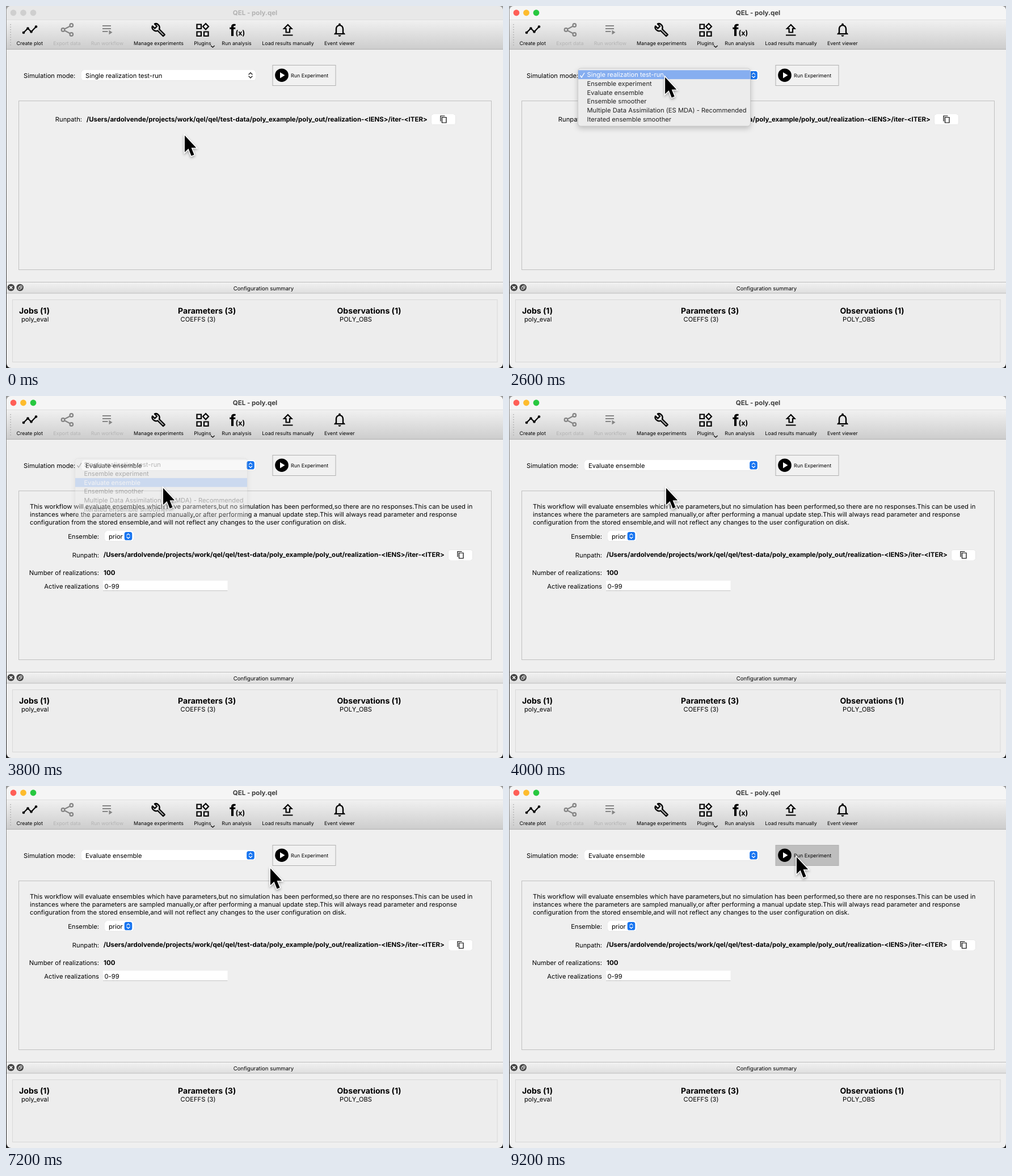
An HTML page that plays this animation: 876x639 px, repeating every 9.6 s.

```html
<!DOCTYPE html>
<html lang="en">
<head>
<meta charset="utf-8">
<title>Experiment runner</title>
<style>
html, body { margin: 0; width: 100%; height: 100%; overflow: hidden; background: #444; }
svg { display: block; width: 100%; height: 100%; }
text {
  font: 11.2px Inter, "Open Sans", sans-serif;
  font-feature-settings: "calt" 0;
  text-rendering: geometricPrecision;
  white-space: pre;
}
.bold { font-weight: 700; font-size: 11.5px; }
.head { font-weight: 700; font-size: 14.1px; }
.small { font-size: 8.9px; }
.mid { text-anchor: middle; }
.end { text-anchor: end; }
.line { fill: none; stroke: #000; stroke-width: 2.2; }
.off { fill: #b4b4b4; }
.field { fill: #fff; filter: drop-shadow(0 .6px .5px #0004); }
#menu { filter: drop-shadow(0 4px 5px #0003); }
#cursor { filter: drop-shadow(0 2px 2px #0005); }
</style>
</head>
<body>
<svg viewBox="0 0 876 639">
  <defs>
    <linearGradient id="back" x2="0" y2="1"><stop stop-color="#999"/><stop offset="1" stop-color="#222"/></linearGradient>
    <linearGradient id="bar" x2="0" y2="1"><stop stop-color="#f1f1f1"/><stop offset="1" stop-color="#cdcdcd"/></linearGradient>
    <linearGradient id="dock" x2="0" y2="1"><stop stop-color="#f2f2f2"/><stop offset="1" stop-color="#dedede"/></linearGradient>
    <clipPath id="frame"><rect x="1" width="875" height="639" rx="8"/></clipPath>
    <path id="chevrons" d="M-3-1.6 0-4.6 3-1.6M-3 1.6 0 4.6 3 1.6" fill="none" stroke-width="1.4" stroke-linecap="round" stroke-linejoin="round"/>
    <g id="stepper">
      <rect x="-6.8" y="-7.2" width="13.6" height="14.4" rx="3.6" fill="#1674f0"/>
      <use href="#chevrons" stroke="#fff" transform="scale(.9)"/>
    </g>
  </defs>
  <rect width="876" height="639" fill="url(#back)"/>
  <g clip-path="url(#frame)">
    <rect width="876" height="639" fill="#efefef"/>

    <rect id="titlebar" width="876" height="24"/>
    <g id="lights">
      <circle cx="13" cy="12" r="5.4"/><circle cx="30.5" cy="12" r="5.4"/><circle cx="48" cy="12" r="5.4"/>
    </g>
    <text id="title" class="bold mid" x="439" y="16">QEL - poly.qel</text>

    <rect y="24" width="876" height="52" fill="url(#bar)"/>
    <path d="M0 24.5H876" stroke="#dedede"/>
    <path d="M0 76.5H876" stroke="#b2b2b2"/>
    <path d="M8 32V72" stroke="#aaa" stroke-width="1.5" stroke-dasharray="1.5 3"/>
    <g id="labels"></g>

    <path class="line" d="M31 47 38.500 39.500 44.500 45.500 53 36.500"/>
    <circle cx="31" cy="47" r="2.3"/><circle cx="38.500" cy="39.500" r="2.3"/>
    <circle cx="44.500" cy="45.500" r="2.3"/><circle cx="53" cy="36.500" r="2.3"/>
    <g class="line" style="stroke:#858585">
      <path d="M113 35.500 103 40.700M103 43.300 113 48.500"/>
      <circle cx="115.300" cy="34" r="2.8"/><circle cx="100.500" cy="42" r="2.8"/><circle cx="115.300" cy="50" r="2.8"/>
      <path d="M170 35H185M170 40H185M170 45H179.500"/>
    </g>
    <path d="M181.500 42.500 187.500 46.500 181.500 50.500Z" fill="#858585"/>
    <path class="line" transform="translate(256 29.500) scale(1.08)" stroke-linejoin="round"
      d="M22 19.500 13 10.500C14.200 7.500 13.400 5 11.600 3.300 9.500 1.300 7 1.200 5.500 1.900L9.300 5.800 5.800 9.300 1.900 5.500C1.200 7 1.300 9.500 3.300 11.600 5 13.400 7.500 14.200 10.500 13L19.500 22Z"/>
    <path class="line" d="M336.500 32.500h7.500v7.500h-7.500zM336.500 45.500h7.500v7.500h-7.500zM349 45.500h7.500v7.500h-7.500zM352 31 357 36.200 352 41.400 347 36.200Z"/>
    <path class="line" style="stroke-width:1.2" d="M361 70 364.300 73 367.600 70"/>
    <text class="bold" x="394" y="53" style="font-size:28px">f</text>
    <text class="bold" x="404.500" y="52" style="font-size:12.500px">(x)</text>
    <path class="line" d="M488 51.500H505.500M496.800 33 503.500 40H500V46.500H493.600V40H490Z"/>
    <path transform="translate(573.600 27.500) scale(1.2)"
      d="M12 22c1.100 0 2-.9 2-2h-4c0 1.100.9 2 2 2zm6-6v-5c0-3.100-1.600-5.600-4.500-6.300V4c0-.8-.7-1.500-1.500-1.500s-1.500.7-1.500 1.500v.7C7.600 5.400 6 7.900 6 11v5l-2 2v1h16v-1zm-2 1H8v-6c0-2.500 1.500-4.500 4-4.500s4 2 4 4.500z"/>

    <text x="31" y="127">Simulation mode:</text>
    <rect class="field" x="133" y="113" width="307" height="18.500" rx="4.500"/>
    <text id="mode" x="140" y="126.500"></text>
    <use id="idle" href="#chevrons" x="431" y="122.300" stroke="#222"/>
    <use id="live" href="#stepper" x="431" y="122.300"/>

    <rect id="run" x="470" y="104.500" width="111" height="36" stroke="#b0b0b0"/>
    <circle cx="486" cy="122.200" r="11.800"/>
    <path d="M483 117 491.500 122.200 483 127.500Z" fill="#fff"/>
    <text class="small" x="502" y="126">Run Experiment</text>

    <rect x="22.500" y="167.500" width="833" height="298" fill="none" stroke="#c0c0c0"/>
    <g id="path">
      <text class="end" x="134" y="204">Runpath:</text>
      <text class="bold" x="141.700" y="203.700">/Users/ardolvende/projects/work/qel/qel/test-data/poly_example/poly_out/realization-&lt;IENS&gt;/iter-&lt;ITER&gt;</text>
      <rect class="field" x="749.500" y="191" width="43" height="18.500" rx="4.500"/>
      <path class="line" style="stroke-width:1.2" d="M768.500 196.500h7.500v9.500h-7.500zM766 203.500V194H773.500"/>
    </g>
    <g id="details">
      <text x="42" y="198.500">This workflow will evaluate ensembles which have parameters,but no simulation has been performed,so there are no responses.This can be used in</text>
      <text x="42" y="212.500">instances where the parameters are sampled manually,or after performing a manual update step.This will always read parameter and response</text>
      <text x="42" y="226.500">configuration from the stored ensemble,and will not reflect any changes to the user configuration on disk.</text>
      <text class="end" x="164" y="252">Ensemble:</text>
      <rect class="field" x="174" y="238" width="51" height="18.500" rx="4.500"/>
      <text x="181" y="251.500">prior</text>
      <use href="#stepper" x="215.500" y="247.300"/>
      <text class="end" x="164" y="316">Number of realizations:</text>
      <text class="bold" x="172" y="316">100</text>
      <text class="end" x="164" y="339.500">Active realizations</text>
      <rect x="171" y="326" width="219.500" height="18" fill="#fff"/>
      <path d="M171 343.700H390.500" stroke="#c2c2c2"/>
      <text x="173.500" y="339.500">0-99</text>
    </g>

    <rect y="488" width="876" height="19" fill="url(#dock)"/>
    <path d="M0 487.500H876M0 507H876" stroke="#bcbcbc"/>
    <circle cx="8.800" cy="497" r="6.200" fill="#444"/><circle cx="24.700" cy="497" r="6.200" fill="#444"/>
    <path d="M6.300 494.500l5 5m0-5l-5 5" stroke="#fff" stroke-width="1.600"/>
    <path d="M22 496h4v4h-4zM24 496V494H28V498H26" fill="none" stroke="#fff" stroke-width=".9"/>
    <text class="mid" x="454" y="501.500" style="font-size:9.600px">Configuration summary</text>
    <rect x="11.500" y="518.500" width="854.500" height="110" fill="#ededed" stroke="#d8d8d8"/>
    <text class="head" x="23" y="543">Jobs (1)</text><text x="27" y="557">poly_eval</text>
    <text class="head" x="303" y="543">Parameters (3)</text><text x="307.500" y="557">COEFFS (3)</text>
    <text class="head" x="583.500" y="543">Observations (1)</text><text x="588" y="557">POLY_OBS</text>

    <g id="menu">
      <rect x="121.500" y="110" width="304" height="102" rx="5" fill="#ececec" stroke="#c4c4c4" stroke-width=".8"/>
      <rect id="glow" x="122" width="303" height="15.800" fill="#86aef0"/>
      <path id="tick" d="M125.500 122.500 128 126 133 118" fill="none" stroke-width="1.300"/>
    </g>
  </g>
  <path id="cursor" d="M1 2.500V32L7.600 25.800 12.600 38.500 17.600 36.500 12.600 24.300H21.200Z" stroke="#fff" stroke-width="3" paint-order="stroke"/>
</svg>
<script>
const $ = id => document.getElementById(id);
const show = (id, on) => $(id).style.opacity = +on;

function addText(parent, text, x, y, cls) {
  const el = document.createElementNS("http://www.w3.org/2000/svg", "text");
  el.textContent = text;
  el.setAttribute("x", x);
  el.setAttribute("y", y);
  el.setAttribute("class", cls);
  return $(parent).appendChild(el);
}

[["Create plot", 41.7], ["Export data", 107.3, "off"], ["Run workflow", 178.3, "off"],
 ["Manage experiments", 269], ["Plugins", 346.5], ["Run analysis", 406.5],
 ["Load results manually", 497], ["Event viewer", 587.8]]
  .forEach(([name, x, cls = ""]) => addText("labels", name, x, 69, "small mid " + cls));

const ROW = 15.75, ROW_TOP = 113.3;
const modes = ["Single realization test-run", "Ensemble experiment", "Evaluate ensemble",
  "Ensemble smoother", "Multiple Data Assimilation (ES MDA) - Recommended", "Iterated ensemble smoother"];
const items = modes.map((name, i) => addText("menu", name, 137.5, 125.2 + ROW * i, ""));

// Cursor stops: time, x, y
const stops = [[0, 314, 226], [200, 314, 226], [800, 273, 121], [2500, 274, 121], [3200, 276, 160],
  [6300, 276, 160], [6400, 287, 161], [7200, 465, 143], [7300, 467, 142], [7900, 506, 123], [9600, 506, 123]];

function cursorAt(t) {
  const i = stops.findIndex(s => s[0] > t);
  const [t0, x0, y0] = stops[i - 1], [t1, x1, y1] = stops[i];
  const u = (t - t0) / (t1 - t0), e = u * u * (3 - 2 * u);
  return [x0 + (x1 - x0) * e, y0 + (y1 - y0) * e];
}

function draw(t) {
  const [x, y] = cursorAt(t);
  $("cursor").setAttribute("transform", `translate(${x} ${y})`);

  const active = t >= 1200, evaluating = t >= 3800;
  const colors = active ? ["#ff5f57", "#febc2e", "#28c840"] : ["#cfcfcf", "#cfcfcf", "#cfcfcf"];
  [...$("lights").children].forEach((c, i) => c.setAttribute("fill", colors[i]));
  $("titlebar").setAttribute("fill", active ? "#f5f5f5" : "#e8e8e8");
  $("title").setAttribute("fill", active ? "#3d3d3d" : "#b2b2b2");
  show("idle", !active);
  show("live", active);

  $("mode").textContent = modes[evaluating ? 2 : 0];
  show("details", evaluating);
  $("path").setAttribute("transform", evaluating ? "translate(30 80.5)" : "");
  $("run").setAttribute("fill", t >= 9200 ? "#bebebe" : "#f1f1f1");

  // The chosen row blinks once, then the menu fades.
  show("menu", t >= 1300 ? Math.max(0, Math.min(1, (3900 - t) / 300)) : 0);
  const row = t >= 3500 && t < 3600 ? -1 : Math.floor((y - ROW_TOP) / ROW);
  show("glow", row >= 0);
  $("glow").setAttribute("y", ROW_TOP + ROW * row);
  items.forEach((el, i) => el.setAttribute("fill", i === row ? "#fff" : "#222"));
  $("tick").setAttribute("stroke", row === 0 ? "#fff" : "#222");
}

const start = performance.now();
function tick() {
  const t = (performance.now() - start) % 9600;
  draw(Math.floor(t / 100) * 100);
  requestAnimationFrame(tick);
}
tick();
</script>
</body>
</html>
```
